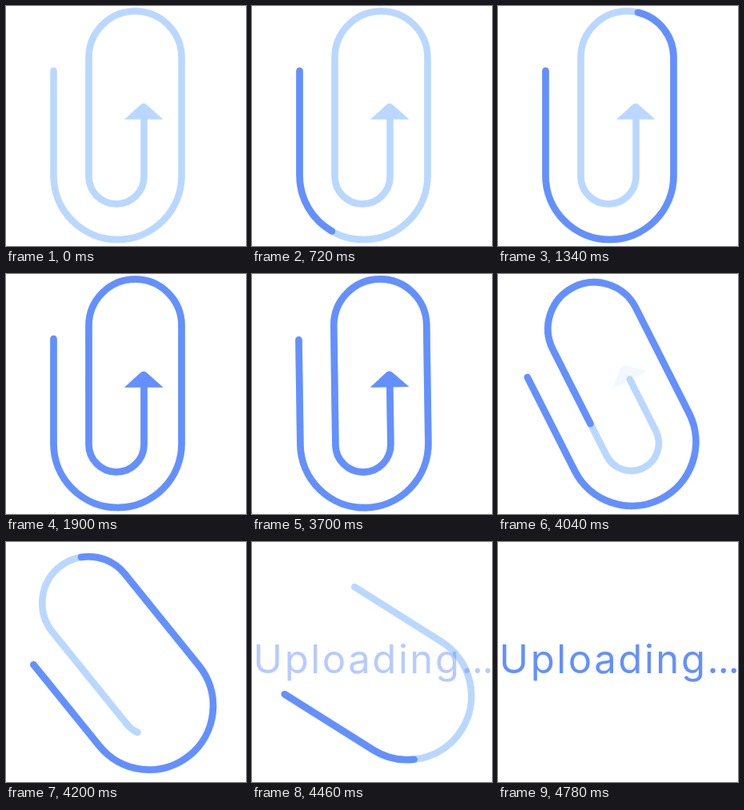
Animation, 300 px wide and 300 px high, one loop 4920 ms. Source, as an HTML page:

```html
<!DOCTYPE html>
<html lang="en">
<head>
<meta charset="utf-8">
<title>Uploading</title>
<style>
  html, body { margin: 0; width: 100%; height: 100%; overflow: hidden; background: #fff; }
  svg { display: block; width: 100%; height: 100%; }
  .wire { fill: none; stroke-width: 8.6; stroke-linecap: round; }
  text { font: 400 49px Inter, Lato, sans-serif; letter-spacing: 2.6px; }
  .dots { letter-spacing: -1px; }
</style>
</head>
<body>
<svg viewBox="0 0 300 300">
  <defs>
    <path id="wire" d="M59.5 81V212A80 80 0 0 0 219.5 212V64.5A58 58 0 0 0 103.5 64.5V213A34.5 34.5 0 0 0 172.5 213V141"/>
    <path id="head" d="M148 141.8L167.5 124Q172 119.6 176.5 124L196.5 141.8Z"/>
  </defs>
  <g id="clip">
    <g stroke="#bad8ff" fill="#bad8ff">
      <use id="paleWire" class="wire" href="#wire"/>
      <use id="paleHead" href="#head" stroke="none"/>
    </g>
    <g stroke="#6490ff" fill="#6490ff">
      <use id="blueWire" class="wire" href="#wire"/>
      <use id="blueHead" href="#head" stroke="none"/>
    </g>
  </g>
  <text id="label" x="1.6" y="163.5" fill="#6490ff">Uploading<tspan class="dots">...</tspan></text>
</svg>
<script>
const LOOP = 4920;
const FULL = document.getElementById('wire').getTotalLength();
const el = id => document.getElementById(id);
const [clip, paleWire, paleHead, blueWire, blueHead, label] =
  ['clip', 'paleWire', 'paleHead', 'blueWire', 'blueHead', 'label'].map(el);

const clamp = (v, lo, hi) => Math.min(hi, Math.max(lo, v));
const ramp = (t, from, to) => clamp((t - from) / (to - from), 0, 1);

// Smooth curve through [time, value] points
function curve(points, t) {
  const last = points.length - 1;
  if (t <= points[0][0]) return points[0][1];
  if (t >= points[last][0]) return points[last][1];
  const slope = i => {
    const a = points[Math.max(i - 1, 0)], b = points[Math.min(i + 1, last)];
    return (b[1] - a[1]) / (b[0] - a[0]);
  };
  const i = points.findIndex(p => p[0] > t) - 1;
  const [t0, v0] = points[i], [t1, v1] = points[i + 1];
  const d = t1 - t0, u = (t - t0) / d, w = 1 - u;
  return w * w * (1 + 2 * u) * v0 + u * u * (3 - 2 * u) * v1
    + d * u * w * (w * slope(i) - u * slope(i + 1));
}

const DRAW = [[140, 0], [660, 184], [1180, 501], [1340, 606], [1740, 995], [1785, FULL]];
const TURN = [[3690, 0], [3880, 14.4], [4200, 38.9], [4760, 79.3], [4920, 91]];
const PALE_DELAY = 206;

// Wire length left while it is being erased from the arrow end
function erased(t) {
  const u = t - 3880;
  return u < -16 ? FULL : clamp(1022 - 1.224 * u - 0.000375 * u * u, 0, FULL);
}

function trim(wire, length) {
  wire.style.display = length > 0 ? '' : 'none';
  wire.setAttribute('stroke-dasharray', length >= FULL ? 'none' : `${length} ${FULL * 2}`);
}

function render(t) {
  clip.setAttribute('transform', `rotate(${-curve(TURN, t)} 149 152.6)`);
  trim(blueWire, t < 3690 ? curve(DRAW, t) : erased(t));
  trim(paleWire, t < 4780 ? erased(t - PALE_DELAY) : 0);
  blueHead.setAttribute('opacity', ramp(t, 1780, 1900) - ramp(t, 3705, 3860));
  paleHead.setAttribute('opacity', 1 - ramp(t, 3915, 4070));
  label.setAttribute('opacity', ramp(t, 4220, 4740));
}

const start = performance.now();
function tick() {
  render((performance.now() - start) % LOOP);
  requestAnimationFrame(tick);
}
tick();
</script>
</body>
</html>
```
